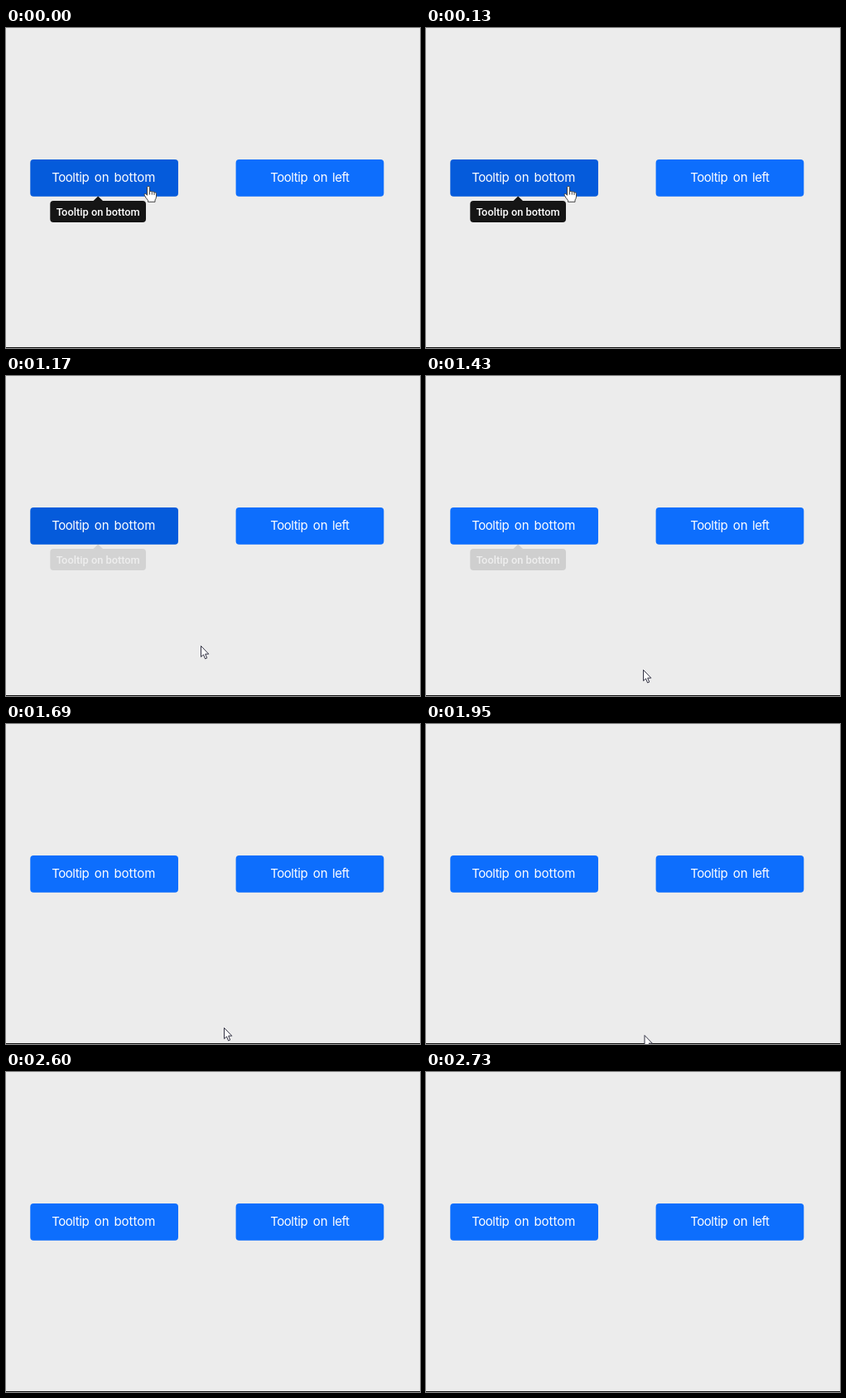
Recreate the animation shown at these times as an HTML page. Size 500 by 387 pixels, loop 3120 ms.

```html
<!DOCTYPE html>
<html lang="en">
<head>
<meta charset="utf-8">
<title>Tooltip demo</title>
<style>
  html, body { margin: 0; width: 100%; height: 100%; overflow: hidden; background: #ececec; }
  svg { display: block; width: 100%; height: 100%; }
  .label { font: 400 15px Inter, sans-serif; fill: #fff; }
  .tight { letter-spacing: -.45px; }
  .tip { font: 500 12.8px Roboto, sans-serif; fill: #fff; }
</style>
</head>
<body>
<svg viewBox="0 0 500 387" preserveAspectRatio="none">
  <rect width="500" height="387" fill="#ececec"/>
  <rect y="386" width="500" height="1" fill="#111"/>

  <rect id="button" x="29.3" y="159" width="178.7" height="44.7" rx="4" fill="#0d6efd"/>
  <text class="label" y="186">
    <tspan class="tight" x="55.2">Tooltip</tspan>
    <tspan x="106.7">on</tspan>
    <tspan x="130.4">bottom</tspan>
  </text>

  <rect x="277.6" y="159" width="178.7" height="44.7" rx="4" fill="#0d6efd"/>
  <text class="label" y="186">
    <tspan class="tight" x="319.2">Tooltip</tspan>
    <tspan x="370.7">on</tspan>
    <tspan class="tight" x="394">left</tspan>
  </text>

  <g id="tooltip">
    <path d="M57 209H105.5L111.2 203.6L117 209H165a4 4 0 0 1 4 4v18a4 4 0 0 1-4 4H57.3a4 4 0 0 1-4-4v-18a4 4 0 0 1 4-4z" fill="#151515"/>
    <text class="tip" x="111.2" y="227.3" text-anchor="middle">Tooltip on bottom</text>
  </g>

  <g id="cursor" stroke-linejoin="round">
    <path id="hand" fill="#fff" stroke="#444" stroke-width="1"
      d="M-1.5 1.2Q0-.8 1.5 1.2V7Q3 5.4 4.3 7.2Q6 6 7 7.8Q9.3 7 9.5 9.5V13Q9.3 15.5 8 17V19.3H-.5V17.5Q-3.5 14-5 11Q-5.3 9-3.3 9.4L-1.5 11.3zM1.5 7V10.5M4.3 7.4V10.7M7 8V11"/>
    <path id="arrow" fill="#fff" stroke="#334" stroke-width="1"
      d="M.5.5V13.7L3.5 11L5.6 16L7.7 15.1L5.7 10.2H9.8z"/>
  </g>
</svg>
<script>
const LOOP = 3120;
const get = id => document.getElementById(id);

// Each pose holds until the next one starts; tip is the tooltip's opacity.
const poses = [
  { at: 0, x: 172, y: 191, shape: "hand", hover: true, tip: 1 },
  { at: 780, x: 195.5, y: 266, shape: "hand", hover: true, tip: 1 },
  { at: 910, x: 216, y: 300, shape: "arrow", hover: true, tip: .55 },
  { at: 1170, x: 235, y: 326, shape: "arrow", hover: true, tip: .11 },
  { at: 1430, x: 262, y: 355, shape: "arrow", hover: false, tip: .13 },
  { at: 1690, x: 263, y: 367, shape: "arrow", hover: false, tip: 0 },
  { at: 1950, x: 263.5, y: 376, shape: "arrow", hover: false, tip: 0 },
  { at: 2210, x: 264, y: 390, shape: "none", hover: false, tip: 0 }
];

function draw(time) {
  const t = time % LOOP;
  const pose = poses.findLast(p => p.at <= t);
  get("cursor").setAttribute("transform", `translate(${pose.x} ${pose.y})`);
  for (const shape of ["hand", "arrow"]) {
    get(shape).setAttribute("visibility", shape === pose.shape ? "visible" : "hidden");
  }
  get("button").setAttribute("fill", pose.hover ? "#055bdb" : "#0d6efd");
  get("tooltip").setAttribute("opacity", pose.tip);
}

const start = performance.now();
function tick() {
  draw(performance.now() - start);
  requestAnimationFrame(tick);
}
tick();
</script>
</body>
</html>
```
